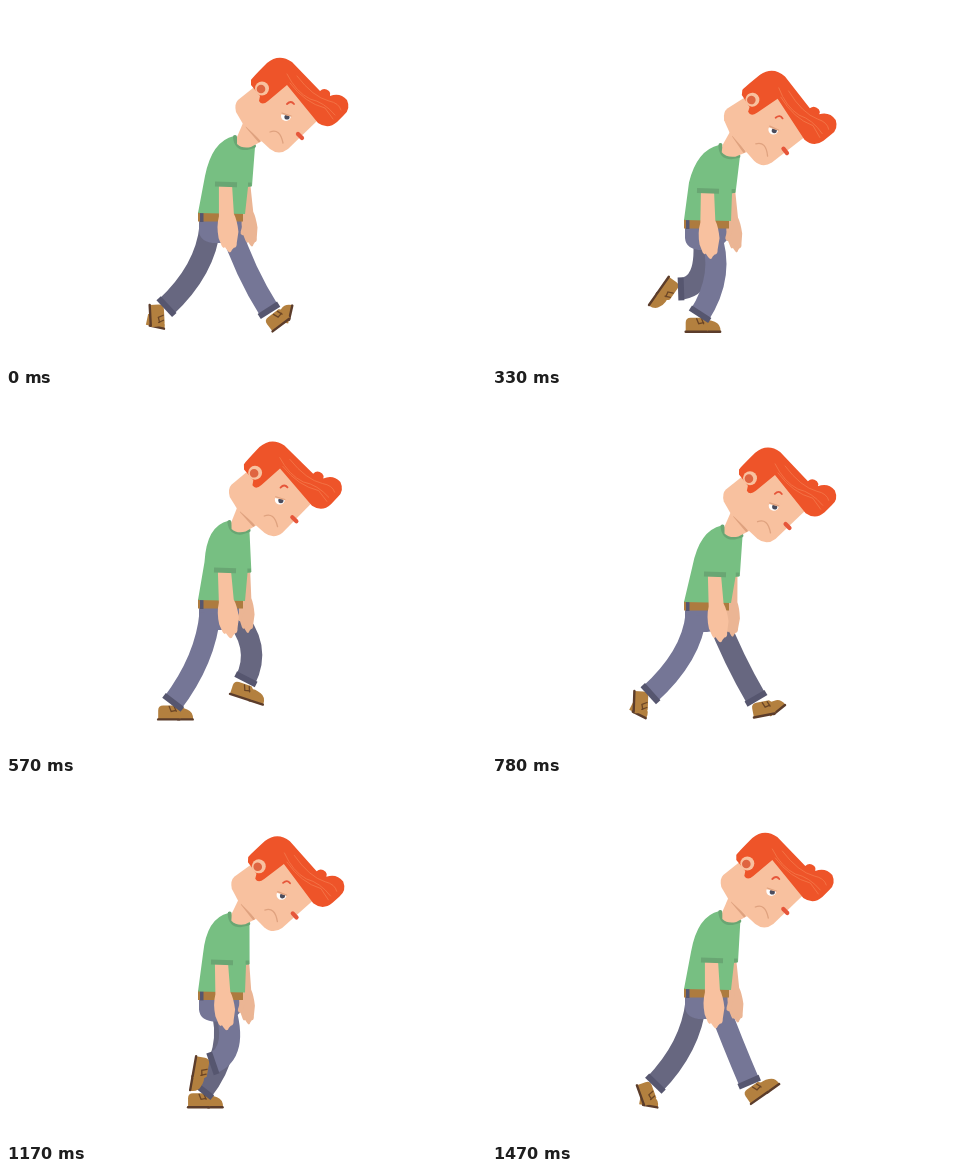
Animation of 480x360 px, one loop 1500 ms. Source, as an HTML page with a canvas:

```html
<!DOCTYPE html>
<html lang="en">
<head>
<meta charset="utf-8">
<title>Sad walk</title>
<style>
html, body { margin: 0; height: 100%; overflow: hidden; background: #fff; }
canvas { display: block; width: 480px; height: 360px; }
</style>
</head>
<body>
<canvas id="stage" width="480" height="360"></canvas>
<script>
const ctx = document.getElementById('stage').getContext('2d');
const LOOP = 1500, STEP = 30;
const C = {
  skin: '#f8c19f', farSkin: '#ebb594', crease: '#dfa27f', hair: '#ee5429', strand: '#f4794b',
  shirt: '#77bf82', hem: '#69a673', jeans: '#757696', farJeans: '#676780', cuff: '#56566f',
  belt: '#ad7b3f', shoe: '#b3803f', sole: '#5b3c2b', lace: '#6b4526', cheek: '#e6563a'
};

// One leg over a full stride: time, hip x, knee control, cuff centre, foot angle, toe bend
const STRIDE = [
  [0, 224, 238, 265, 264, 306, -37, -40],
  [30, 224, 241, 265, 265, 306, -11, -28],
  [180, 225, 242, 258, 240, 308, 0, 0],
  [330, 218, 234, 268, 207, 310, 0, 0],
  [420, 214, 229, 268, 196, 310, 0, 0],
  [570, 204, 200, 265, 166, 310, 0, 0],
  [720, 204, 199, 265, 162, 303, 70, -60],
  [750, 204, 200, 264, 159, 302, 87, -75],
  [780, 204, 200, 262, 157, 301, 92, -65],
  [930, 205, 207, 288, 165, 297, 115, 0],
  [1080, 211, 217, 282, 187, 283, 125, 0],
  [1170, 218, 234, 272, 205, 282, 100, 0],
  [1320, 226, 257, 252, 239, 287, 18, 0],
  [1470, 225, 240, 260, 258, 302, -35, 0]
];

// Upper body repeats every step: time, neck offset, head tilt, sleeve offset, hip drop
const SWAY = [
  [0, 0, 0, 0, 0, 0, 0],
  [30, 1.5, 1.5, 0.5, 3, 2, 1],
  [180, 5, 10, 7, 2, 7, 7],
  [330, -1, 9, 6, -4, 6.5, 7],
  [420, -5.5, 1, 2.5, -4, 2, 2.5],
  [570, -5.5, -3.3, -1.5, -1, -2, -1],
  [720, -0.7, -1, 0, 0, 0, 0]
];

// Smooth periodic interpolation without overshoot
function sample(rows, period, time) {
  const n = rows.length, t = time % period;
  const at = (k, c) => rows[(k + n) % n][c] + (c ? 0 : period * Math.floor(k / n));
  const secant = (k, c) => (at(k + 1, c) - at(k, c)) / (at(k + 1, 0) - at(k, 0));
  const slope = (k, c) => {
    const a = secant(k - 1, c), b = secant(k, c);
    return a * b <= 0 ? 0 : 2 * a * b / (a + b);
  };
  let i = n - 1;
  while (rows[i][0] > t) i--;
  const span = at(i + 1, 0) - at(i, 0), u = (t - at(i, 0)) / span, v = 1 - u;
  return rows[0].slice(1).map((_, j) => {
    const c = j + 1;
    return v * v * (1 + 2 * u) * at(i, c) + u * u * (3 - 2 * u) * at(i + 1, c)
      + span * u * v * (v * slope(i, c) - u * slope(i + 1, c));
  });
}

const rad = deg => deg * Math.PI / 180;
const fill = (d, color) => { ctx.fillStyle = color; ctx.fill(new Path2D(d)); };
const line = (d, color, width, cap = 'round') => {
  ctx.strokeStyle = color;
  ctx.lineWidth = width;
  ctx.lineCap = cap;
  ctx.stroke(new Path2D(d));
};
const disc = (x, y, r, color) => {
  ctx.fillStyle = color;
  ctx.beginPath();
  ctx.arc(x, y, r, 0, 7);
  ctx.fill();
};
function placed(x, y, angle, draw) {
  ctx.save();
  ctx.translate(x, y);
  ctx.rotate(angle);
  draw();
  ctx.restore();
}

function shoe(bend) {
  placed(12, 9, rad(bend), () => {
    fill('M-5 0 L-5 -11 Q2 -13 8 -10 Q14 -8 14 0Z', C.shoe);
    line('M-1 0 H13.5', C.sole, 2.4);
  });
  fill('M-9 9 V0 Q-9 -5 -4 -5 H9 Q14 -2 13 9Z', C.shoe);
  line('M-9 9 H12', C.sole, 2.4);
  line('M2 -4 L4 1 L9 0 M7 -4 L9 1', C.lace, 1.3);
}

function leg(time, drop, color) {
  const [hx, kx, ky, ex, ey, angle, bend] = sample(STRIDE, LOOP, time);
  const len = Math.hypot(ex - kx, ey - ky), dx = (ex - kx) / len, dy = (ey - ky) / len;
  placed(ex + 8 * dx, ey + 8 * dy, rad(angle), () => shoe(bend));
  line(`M${hx} ${220 + drop} Q${kx} ${ky} ${ex} ${ey}`, color, 21, 'butt');
  line(`M${ex - 5 * dx} ${ey - 5 * dy} L${ex + dx} ${ey + dy}`, C.cuff, 23, 'butt');
}

const ARM = 'M-7 -3 L-8 30 Q-11 40 -9 52 L-6 60 Q-4 63 -3 61 L-1 64 Q2 69 4 64 L6 62 ' +
  'Q9 62 9 57 L11 46 Q10 34 7 28 L6 -3Z';

function head() {
  fill('M-1 -18 L18 0 L7 6 Q-2 8 -7 3 L-7 -4Z', C.skin);
  line('M3 -14 L15 0', C.crease, 2.5);
  ctx.translate(-238, -135);
  fill('M247 82 L232 94 Q228 98 230 106 L237 118 L264 143 Q273 150 282 143 L313 113 L284 76 Z', C.skin);
  fill('M245 74 Q246 72 261 57 Q273 47 286 56 L314 85 Q318 81 323 85 Q325 87 324 90 ' +
    'Q334 86 341 94 Q345 103 338 109 L331 116 Q322 124 312 117 L281 79 L262 95 ' +
    'Q256 100 253 95 L254 90 L245 79Z', C.hair);
  line('M281 68 Q290 86 304 93 Q318 96 329 109 M284 77 Q299 97 319 102 L327 113 ' +
    'M291 70 Q307 91 323 95 Q333 97 335 104', C.strand, 0.8);
  disc(256, 82.5, 7, C.skin);
  disc(255, 83, 4.3, '#df6541');
  line('M281 98 Q285 94 288 98', C.cheek, 1.8);
  disc(280, 110, 5, '#fff');
  disc(281, 111, 2.6, '#4b4c5c');
  fill('M274 108 Q277 101 286 106 L287 111Z', C.skin);
  line('M276 107 L285 110', C.crease, 1.2);
  line('M264 126 Q274 122 277 137', C.crease, 1.3);
  line('M292 128 L296 132', C.cheek, 4.2);
}

function draw(time) {
  const [nx, ny, tilt, sx, sy, drop] = sample(SWAY, LOOP / 2, time);
  const turn = 2 * Math.PI / LOOP;
  ctx.fillStyle = '#fff';
  ctx.fillRect(0, 0, 480, 360);

  leg(time + LOOP / 2, drop, C.farJeans);
  placed(0, drop, 0, () =>
    fill('M193 213 H237 L236 226 Q226 238 213 237 Q194 238 193 225Z', C.jeans));
  leg(time, drop, C.jeans);

  const farTip = 243 + 3 * Math.cos(turn * (time - 80)), farX = 240 + sx * 0.3;
  placed(farX, 181 + sy * 0.9, Math.atan2(farX + 1 - farTip, 61), () => {
    ctx.scale(0.75, 0.9);
    fill(ARM, C.farSkin);
    line('M-2 34 L-9 50', C.farSkin, 6);
  });

  placed(0, drop, 0, () => {
    fill('M192 206 H237 V215.5 H192Z', C.belt);
    fill('M194 206 H197.5 V216 H194Z', C.cuff);
  });
  fill(`M${228 + nx} ${130 + ny} Q${206 + nx} ${135 + ny} ${199 + sx * 0.5} ${170 + sy}
    L192 ${207 + drop} L239 ${208 + drop} L${242 + sx * 0.5} ${181 + sy}
    L${246 + sx * 0.6} ${180 + sy} L${249 + nx} ${141 + ny}Z`, C.shirt);
  line(`M${242 + sx * 0.6} ${178.5 + sy} h3.5`, C.hem, 4, 'butt');

  const nearTip = 4.3 - 1.2 * Math.cos(turn * time) - 5 * Math.max(0, Math.cos(2 * turn * (time - 200)));
  placed(220 + sx, 180 + sy, -Math.atan2(nearTip - 1, 67), () => fill(ARM, C.skin));
  line(`M${209 + sx} ${178 + sy} l22 0.7`, C.hem, 5, 'butt');

  placed(238 + nx, 135 + ny, rad(tilt), () => {
    line('M-9 -4 Q-8 8 3 7 L10 5', C.hem, 4);
    head();
  });
}

function play(now) {
  draw(Math.floor(now % LOOP / STEP) * STEP);
  requestAnimationFrame(play);
}
play(performance.now());
</script>
</body>
</html>
```
